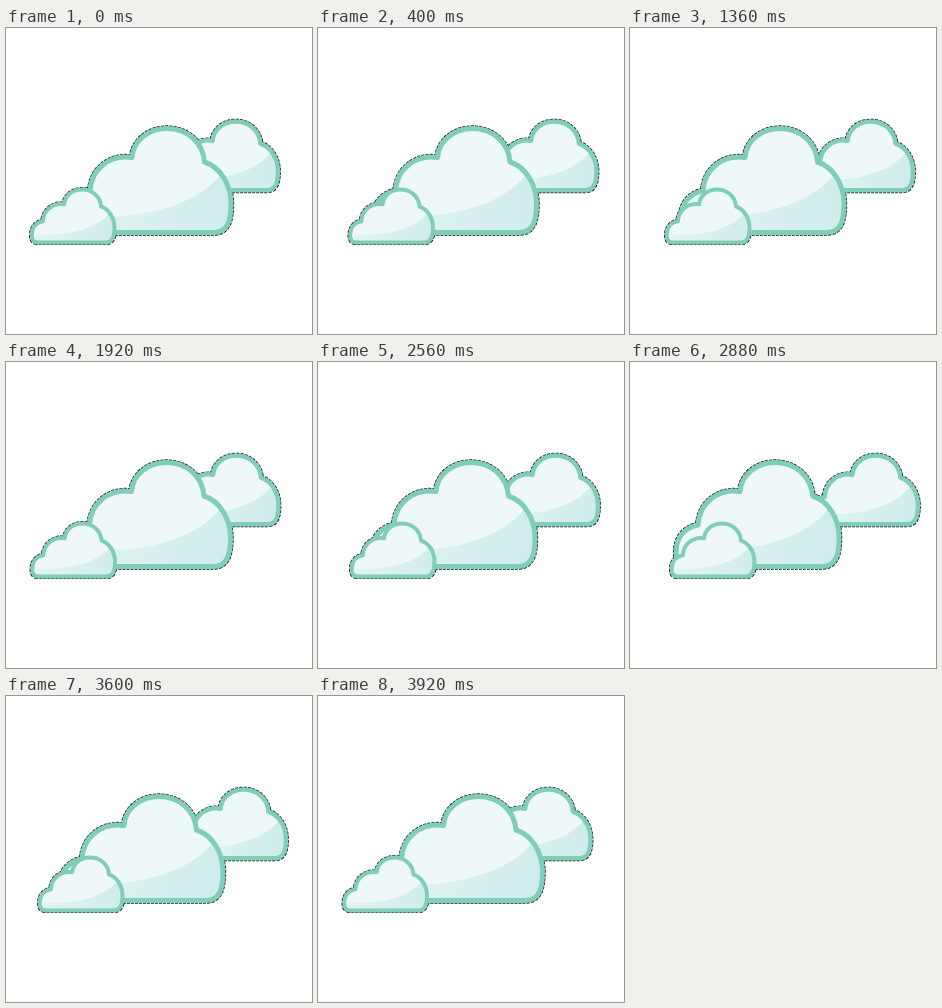
Recreate the animation shown at these times as an HTML page with a canvas. Size 306 px wide and 306 px high, loop 4000 ms.

```html
<!DOCTYPE html>
<html lang="en">
<head>
<meta charset="utf-8">
<title>Drifting clouds</title>
<style>
  html, body { margin: 0; width: 100%; height: 100%; overflow: hidden; background: #fff; }
  canvas { display: block; width: 306px; height: 306px; }
</style>
</head>
<body>
<canvas id="stage" width="306" height="306"></canvas>
<script>
const ctx = document.getElementById("stage").getContext("2d");
const LOOP = 4000, STEP = 80;

// Cloud shape; its lower right corner (225, 204.5) is the anchor.
const ANCHOR = { x: 225, y: 204.5 };
const outline = new Path2D(`M73 204.5 C64 204.5 62 198 62 190
  C62 175 71 165 84 163 C85 141 104 126 126 129.5
  C127 113 142 100.5 161 100.5 C181 100.5 197 114 198.5 134
  C214 139 225 156 225 176 C225 194 221 204.5 208 204.5 Z`);
const shade = new Path2D("M70 189 C128 192 190 180 215 146 L232 146 L232 210 L70 210 Z");

// dir: 1 drifts right first, -1 drifts left first
const clouds = [
  { x: 272, y: 162.3, scale: 0.661, line: 4.5, dir: 1 },
  { x: 225, y: 204.5, scale: 1, line: 5, dir: -1 },
  { x: 108.5, y: 214.4, scale: 0.508, line: 4, dir: 1 }
];

// [time, drift in pixels]
const keys = [
  [0, 0], [240, 3], [560, 10.6], [720, 16], [960, 19.2], [1120, 17.3],
  [1360, 11], [1680, 3.7], [1920, 0.5], [2000, 0], [2240, 2.4], [2560, 8],
  [2800, 14], [3080, 19.2], [3280, 16.4], [3360, 14.2], [3600, 8],
  [3800, 3.5], [3920, 0.5], [4000, 0]
];

function slope(i) {
  if (i === 0 || i === keys.length - 1) return 0;
  const [a, b, c] = [keys[i - 1], keys[i], keys[i + 1]];
  if ((b[1] - a[1]) * (c[1] - b[1]) <= 0) return 0;
  return (c[1] - a[1]) / (c[0] - a[0]);
}

function drift(t) {
  const i = keys.findIndex((key, n) => n > 0 && t <= key[0]) - 1;
  const [t0, v0] = keys[i], [t1, v1] = keys[i + 1];
  const span = t1 - t0, u = (t - t0) / span, w = 1 - u;
  return v0 * w * w * (1 + 2 * u) + v1 * u * u * (3 - 2 * u)
    + span * u * w * (slope(i) * w - slope(i + 1) * u);
}

function place(cloud, shift, paint) {
  ctx.save();
  ctx.translate(cloud.x + cloud.dir * shift, cloud.y);
  ctx.scale(cloud.scale, cloud.scale);
  ctx.translate(-ANCHOR.x, -ANCHOR.y);
  paint(cloud);
  ctx.restore();
}

function paintFringe({ line, scale }) {
  ctx.strokeStyle = "#111";
  ctx.lineWidth = (line + 1.3) / scale;
  ctx.setLineDash([3 / scale, 1 / scale]);
  ctx.stroke(outline);
}

function paintCloud({ line, scale }) {
  ctx.fillStyle = "#eef8f8";
  ctx.fill(outline);
  ctx.save();
  ctx.clip(outline);
  const tint = ctx.createLinearGradient(80, 0, 215, 0);
  tint.addColorStop(0, "#e0f3f2");
  tint.addColorStop(1, "#d0edec");
  ctx.fillStyle = tint;
  ctx.fill(shade);
  ctx.restore();
  ctx.strokeStyle = "#80cdb9";
  ctx.lineWidth = line / scale;
  ctx.lineJoin = "round";
  ctx.stroke(outline);
}

function draw(now) {
  const t = Math.floor((now % LOOP) / STEP) * STEP;
  const shift = drift(t);
  ctx.fillStyle = "#fff";
  ctx.fillRect(0, 0, 306, 306);
  for (const cloud of clouds) place(cloud, shift, paintFringe);
  for (const cloud of clouds) place(cloud, shift, paintCloud);
}

let start;
function tick(now) {
  start ??= now;
  draw(Math.max(0, now - start));
  requestAnimationFrame(tick);
}
draw(0);
requestAnimationFrame(tick);
</script>
</body>
</html>
```
